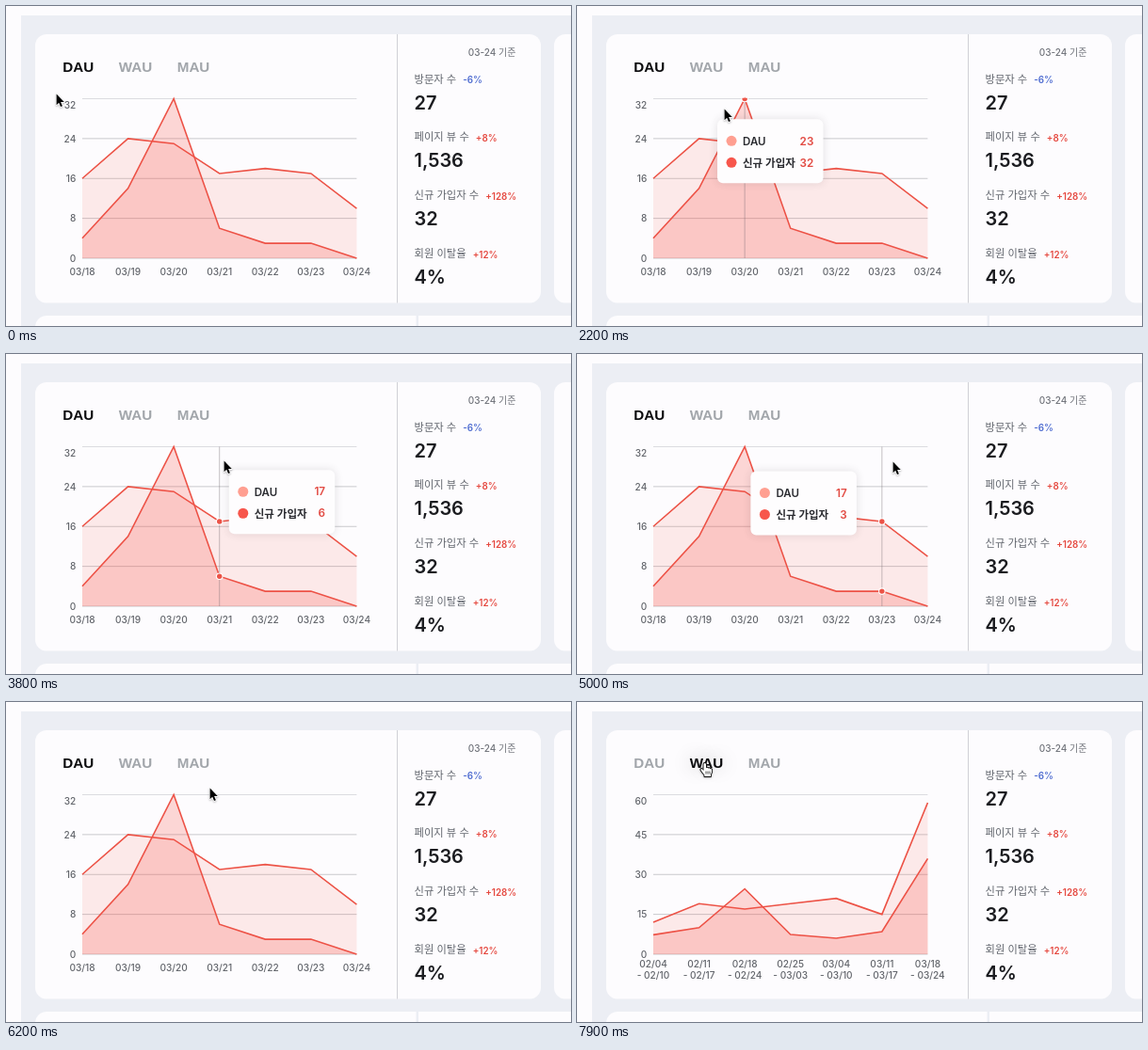
Animation, 600 px wide and 340 px high, one loop 8 s. Source, as an HTML page with a canvas:

```html
<!DOCTYPE html>
<html lang="ko">
<head>
<meta charset="utf-8">
<style>
html, body { margin: 0; width: 600px; height: 340px; overflow: hidden; }
canvas { display: block; width: 600px; height: 340px; }
</style>
</head>
<body>
<canvas id="stage"></canvas>
<script>
const LOOP = 8000, STEP = 100, CLICK = 7300, MORPH = 600;
const LEFT = 81, GAP = 48.57, TOP = 98.5, BASE = 268;
const RED = '#ec5347', PAPER = '#fdfcfe', GREY = '#eceef4', TICK = '#62656b';
const SANS = 'Inter, "Noto Sans CJK KR", "Noto Sans CJK", sans-serif';
const HEAD = '"Liberation Sans", Arial, sans-serif';

const day = { max: 32, visits: [16, 24, 23, 17, 18, 17, 10], joins: [4, 14, 32, 6, 3, 3, 0] };
const week = { max: 60, visits: [12, 19, 17, 19, 21, 15, 57], joins: [7.3, 10, 24.6, 7.4, 6, 8.5, 36] };
const stats = [
  ['방문자 수', '-6%', '27'],
  ['페이지 뷰 수', '+8%', '1,536'],
  ['신규 가입자 수', '+128%', '32'],
  ['회원 이탈율', '+12%', '4%']
];
// pointer stops: time, x, y
const path = [
  [0, 53, 93], [1200, 94, 113], [1700, 105, 113], [2200, 156, 109], [3800, 231, 113],
  [4850, 296, 114], [5000, 335, 114], [5700, 352, 110], [6200, 216, 91], [6900, 136, 65]
];

const canvas = document.getElementById('stage');
const ctx = canvas.getContext('2d');
const ratio = window.devicePixelRatio || 1;
canvas.width = 600 * ratio;
canvas.height = 340 * ratio;

const colX = i => LEFT + i * GAP;
const toY = (v, max) => BASE - v / max * (BASE - TOP);
const mix = (a, b, p) => a + (b - a) * p;
const clamp = p => Math.min(1, Math.max(0, p));

// month/day, counted from 18 March
function date(offset) {
  const d = new Date(2023, 2, 18 + offset);
  return [d.getMonth() + 1, d.getDate()].map(n => String(n).padStart(2, '0')).join('/');
}

// draws a string and returns its width
function text(str, x, y, size, weight, color, align = 'left', family = SANS) {
  ctx.font = `${weight} ${size}px ${family}`;
  ctx.textAlign = align;
  ctx.fillStyle = color;
  ctx.fillText(str, x, y);
  return ctx.measureText(str).width;
}

function box(x, y, w, h, r, color) {
  ctx.fillStyle = color;
  ctx.beginPath();
  ctx.roundRect(x, y, w, h, r);
  ctx.fill();
}

function line(x1, y1, x2, y2, color, width = 1) {
  ctx.strokeStyle = color;
  ctx.lineWidth = width;
  ctx.beginPath();
  ctx.moveTo(x1, y1);
  ctx.lineTo(x2, y2);
  ctx.stroke();
}

function disc(x, y, r, color) {
  ctx.fillStyle = color;
  ctx.beginPath();
  ctx.arc(x, y, r, 0, 7);
  ctx.fill();
}

function pointer(t) {
  const next = path.findIndex(k => k[0] > t);
  const i = next < 0 ? path.length - 1 : Math.max(1, next);
  const [a, b] = [path[i - 1], path[i]];
  const p = clamp((t - a[0]) / (b[0] - a[0]));
  return [mix(a[1], b[1], p), mix(a[2], b[2], p)];
}

// column under the pointer, or -1 outside the plot
function column(t) {
  const [x, y] = pointer(t);
  return x < LEFT || y < TOP ? -1 : Math.min(6, Math.round((x - LEFT) / GAP));
}

function overTab(t) {
  const [x, y] = pointer(t);
  return x < 156 && y < 76;
}

function drawPage() {
  box(0, 0, 600, 340, 0, PAPER);
  box(16, 10, 584, 330, 0, GREY);
  box(31, 30, 537, 285.5, 12, PAPER);
  box(582, 30, 60, 285.5, 12, PAPER);
  box(31, 329, 640, 60, 12, PAPER);
  box(435.5, 329, 2.5, 11, 0, GREY);
  line(415.5, 30, 415.5, 315.5, '#d0d1d6');
}

function drawStats() {
  text('03-24 기준', 541.5, 52.5, 10, 500, '#6f7279', 'right');
  stats.forEach(([label, diff, value], i) => {
    const y = 81.5 + i * 61.9;
    const w = text(label, 433.5, y, 11.3, 400, '#62666e');
    text(diff, 433.5 + w + 7, y + 0.3, 9.8, 600, diff[0] === '-' ? '#4d6bd0' : '#e5483f');
    text(value, 433.5, y + 28, 20, 600, '#1b1c20');
  });
}

function drawTabs(t) {
  const on = t >= CLICK ? 'WAU' : 'DAU';
  let x = 60.2;
  for (const name of ['DAU', 'WAU', 'MAU']) {
    ctx.save();
    if (name === 'WAU' && overTab(t)) {
      ctx.shadowColor = 'rgba(0,0,0,.3)';
      ctx.shadowBlur = 20 * ratio;
    }
    x += 26.6 + text(name, x, 69.5, 15.2, 700, name === on ? '#0c0c0e' : '#a2a6ab', 'left', HEAD);
    ctx.restore();
  }
}

function area(ys, alpha) {
  ctx.beginPath();
  ys.forEach((y, i) => ctx.lineTo(colX(i), y));
  ctx.strokeStyle = RED;
  ctx.lineWidth = 1.6;
  ctx.stroke();
  ctx.lineTo(colX(6), BASE);
  ctx.lineTo(LEFT, BASE);
  ctx.fillStyle = `rgba(244,80,70,${alpha})`;
  ctx.fill();
}

function drawAxes(weekly) {
  const max = weekly ? week.max : day.max;
  for (let i = 0; i < 5; i++) {
    const v = max * i / 4, y = toY(v, max);
    line(LEFT, y, colX(6), y, i === 4 ? '#dcdce0' : '#c9c9cd');
    text(v, 74.3, Math.max(y, 105) + 3.8, 10.1, 500, TICK, 'right');
  }
  for (let i = 0; i < 7; i++) {
    const start = (i - 6) * 7;
    const rows = weekly ? [date(start), '- ' + date(start + 6)] : [date(i)];
    rows.forEach((row, j) =>
      text(row, colX(i), (weekly ? 282.3 : 285.8) + j * 12, 10.1, 500, TICK, 'center'));
  }
}

function drawChart(t, active) {
  const p = 1 - (1 - clamp((t - CLICK) / MORPH)) ** 3;
  const curve = key => day[key].map((v, i) => mix(toY(v, day.max), toY(week[key][i], week.max), p));
  const visits = curve('visits'), joins = curve('joins');
  drawAxes(t >= CLICK);
  area(visits, 0.11);
  area(joins, 0.22);
  if (active < 0) return;

  const x = colX(active);
  line(x, TOP, x, BASE, 'rgba(120,110,115,.42)');
  ctx.save();
  ctx.beginPath();
  ctx.rect(70, TOP - 0.8, 320, 180);
  ctx.clip();
  for (const ys of [visits, joins]) {
    disc(x, ys[active], 3.8, '#fff');
    disc(x, ys[active], 2.7, RED);
  }
  ctx.restore();
}

// the tip eases towards the hovered column and flips near the right edge
function tipX(t) {
  let x = null;
  for (let s = 0; s <= t; s += 10) {
    const i = column(s);
    if (i < 0) continue;
    const goal = colX(i) + (i > 3 ? -123 : 10.5);
    x = x === null ? goal : mix(x, goal, 0.074);
  }
  return x;
}

function drawTip(t, active) {
  const x = tipX(t), y = pointer(t - 100)[1] + 10.5;
  ctx.save();
  ctx.shadowColor = 'rgba(60,50,60,.14)';
  ctx.shadowBlur = 10 * ratio;
  box(x, y, 112.5, 68, 6, '#fefdfe');
  ctx.restore();
  [['DAU', 'visits', '#ff9f91'], ['신규 가입자', 'joins', '#f7564c']].forEach(([name, key, color], i) => {
    const cy = y + 23 + i * 23;
    disc(x + 15, cy, 5.5, color);
    text(name, x + 27, cy + 4.5, 11.5, 600, '#2a2b30');
    text(day[key][active], x + 102.3, cy + 4.2, 11.7, 600, '#e24a42', 'right');
  });
}

function outline(shape, x, y, fill, stroke, width) {
  ctx.save();
  ctx.translate(x, y);
  ctx.lineJoin = 'round';
  ctx.shadowColor = 'rgba(0,0,0,.25)';
  ctx.shadowBlur = 2 * ratio;
  ctx.shadowOffsetY = ratio;
  ctx.strokeStyle = stroke;
  ctx.lineWidth = width;
  ctx.stroke(shape);
  ctx.shadowColor = 'transparent';
  ctx.fillStyle = fill;
  ctx.fill(shape);
  ctx.restore();
}

const arrow = new Path2D('M.6 .6V12.2L3.2 9.8 5 14 6.9 13.2 5.1 9.1H8.8Z');
const hand = new Path2D('M-1.5 9V1.4Q-1.5 0 -.3 0T1 1.4V5Q2.8 4.2 3.2 5.4 4.9 4.7 5.4 6 7.2 5.6 7.2 7.4 7.4 10 6 12V14H-.6V12.4Q-2.6 10.4 -4.4 7.6 -5.2 6 -3.6 6Q-2.6 6.4 -1.5 8');

function drawPointer(t) {
  const [x, y] = pointer(t);
  if (!overTab(t)) return outline(arrow, x, y, '#000', '#fff', 1.6);
  outline(hand, x, y, '#fff', '#111', 1.8);
  for (const dx of [1, 3, 5]) line(x + dx, y + 8.5, x + dx, y + 11.5, '#222', 0.8);
}

function draw(t) {
  ctx.setTransform(ratio, 0, 0, ratio, 0, 0);
  const active = column(t);
  drawPage();
  drawStats();
  drawTabs(t);
  drawChart(t, active);
  if (active >= 0) drawTip(t, active);
  drawPointer(t);
}

const begin = performance.now();
function tick() {
  const t = (performance.now() - begin) % LOOP;
  draw(Math.floor(t / STEP) * STEP);
  requestAnimationFrame(tick);
}
tick();
</script>
</body>
</html>
```
